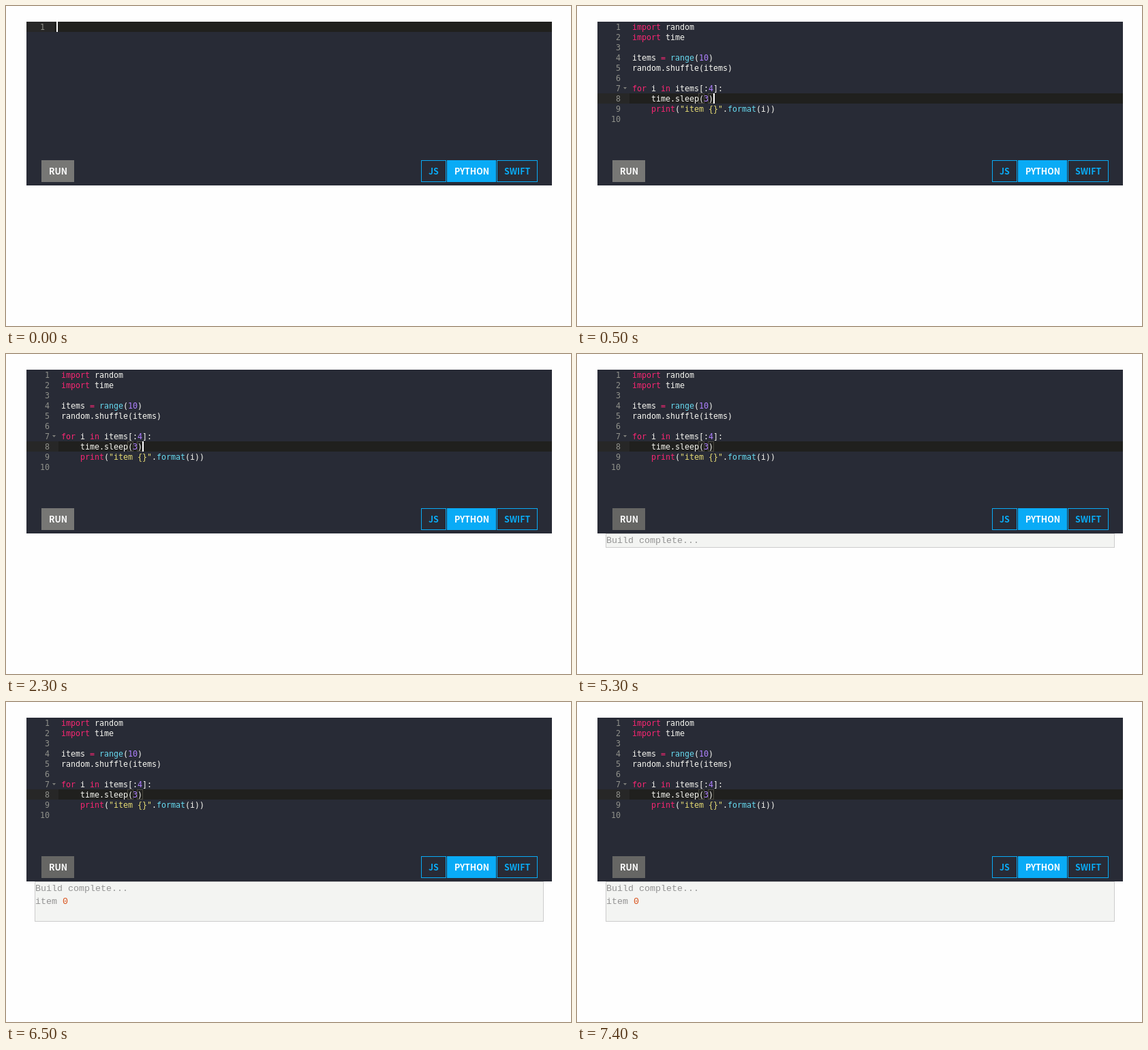
Write an HTML page that moves like this. It is 829 px wide and 469 px high and loops after 8 s.

```html
<!DOCTYPE html>
<html lang="en">
<head>
<meta charset="utf-8">
<title>Code runner</title>
<style>
  html, body { margin: 0; width: 100%; height: 100%; overflow: hidden; background: #fefefe; }
  svg { display: block; width: 829px; height: 469px; }
  text { white-space: pre; }
  .code { font: 11.63px "DejaVu Sans Mono", monospace; fill: #f8f8f2; }
  .num { fill: #8f908a; text-anchor: end; }
  .key { fill: #f92672; }
  .fn { fill: #66d9ef; }
  .val { fill: #ae81ff; }
  .str { fill: #e6db74; }
  .btn { font: 700 12.4px "Noto Sans CJK JP", "Noto Sans CJK SC", "Noto Sans", sans-serif; }
  .out { font: 13.333px "Liberation Mono", monospace; fill: #939393; }
</style>
</head>
<body>
<svg id="stage" viewBox="0 0 829 469"></svg>
<script>
const LOOP = 8000, TYPED = 500, BUILT = 3500, PRINTED = 6500;
const LEFT = 81, TOP = 23, COL = 7, ROW = 15;
const BLUE = '#09abf6';
const stage = document.getElementById('stage');

// Each line is a run of "class|text" tokens.
const program = [
  ['key|import', '| random'],
  ['key|import', '| time'],
  [],
  ['|items ', 'key|=', '| ', 'fn|range', '|(', 'val|10', '|)'],
  ['|random.shuffle(items)'],
  [],
  ['key|for', '| i ', 'key|in', '| items[:', 'val|4', '|]:'],
  ['|    time.sleep(', 'val|3', '|)'],
  ['|    ', 'key|print', '|(', 'str|"item {}"', '|.', 'fn|format', '|(i))'],
  []
];

function add(parent, tag, attrs, text) {
  const el = document.createElementNS('http://www.w3.org/2000/svg', tag);
  for (const k in attrs) el.setAttribute(k, attrs[k]);
  if (text !== undefined) el.textContent = text;
  parent.appendChild(el);
  return el;
}
const group = () => add(stage, 'g', {});
const rect = (p, x, y, width, height, fill) => add(p, 'rect', { x, y, width, height, fill });
const box = (p, x, y, w, h, stroke, fill = 'none') =>
  add(p, 'rect', { x: x + .5, y: y + .5, width: w - 1, height: h - 1, stroke, fill });
const label = (p, x, y, cls, text) => add(p, 'text', { x, y, class: cls }, text);
const show = (el, on) => el.setAttribute('visibility', on ? 'visible' : 'hidden');

function activeLine(p, y, gutterEnd) {
  rect(p, 30, y, 771, ROW, '#20201e');
  rect(p, 30, y, gutterEnd - 30, ROW, '#272727');
}

function drawLine(p, tokens, i) {
  const y = TOP + ROW * i + 12;
  label(p, 64, y, 'code num', i + 1);
  let col = 0;
  for (const token of tokens) {
    const cut = token.indexOf('|');
    const text = token.slice(cut + 1);
    const pad = text.length - text.trimStart().length;
    if (text.trim()) label(p, LEFT + COL * (col + pad), y, 'code ' + token.slice(0, cut), text.trim());
    col += text.length;
  }
}

function button(x, w, text, fill, ink) {
  const face = ink === BLUE ? box(stage, x, 226, w, 32, BLUE) : rect(stage, x, 226, w, 32, fill);
  label(stage, x + 11, 247, 'btn', text).setAttribute('fill', ink);
  return face;
}

rect(stage, 30, 23, 771, 240, '#282b36');

const blank = group();
activeLine(blank, TOP, 71);
label(blank, 57, TOP + 12, 'code num', 1);
rect(blank, 74, TOP, 2, ROW, '#fff');

const editor = group();
activeLine(editor, TOP + ROW * 7, 77);
for (const col of [14, 16]) box(editor, LEFT + COL * col - 1, 128, 9, ROW, '#49483e');
program.forEach((tokens, i) => drawLine(editor, tokens, i));
add(editor, 'path', { d: 'M68 119h5l-2.5 3z', fill: '#7d7e7a' });
const caret = rect(stage, 200, 128, 2, ROW, '#fff');

const run = button(52, 48, 'RUN', '#777775', '#fff');
button(609, 37, 'JS', 'none', BLUE);
button(647, 72, 'PYTHON', BLUE, '#fff');
button(720, 60, 'SWIFT', 'none', BLUE);

const output = group();
const panel = box(output, 42, 263, 747, 21, '#ccc', '#f3f4f2');
label(output, 43, 277, 'out', 'Build complete...');
const result = group();
label(result, 43, 296, 'out', 'item');
label(result, 83, 296, 'out', '0').style.fill = '#d9541e';

function draw(t) {
  const typed = t >= TYPED, built = t >= BUILT, printed = t >= PRINTED;
  show(blank, !typed);
  show(editor, typed);
  show(caret, typed && !built);
  show(output, built);
  show(result, printed);
  run.setAttribute('fill', built ? '#666664' : '#777775');
  panel.setAttribute('height', printed ? 58 : 20);
}

const start = performance.now();
function tick() {
  draw((performance.now() - start) % LOOP);
  requestAnimationFrame(tick);
}
tick();
</script>
</body>
</html>
```
